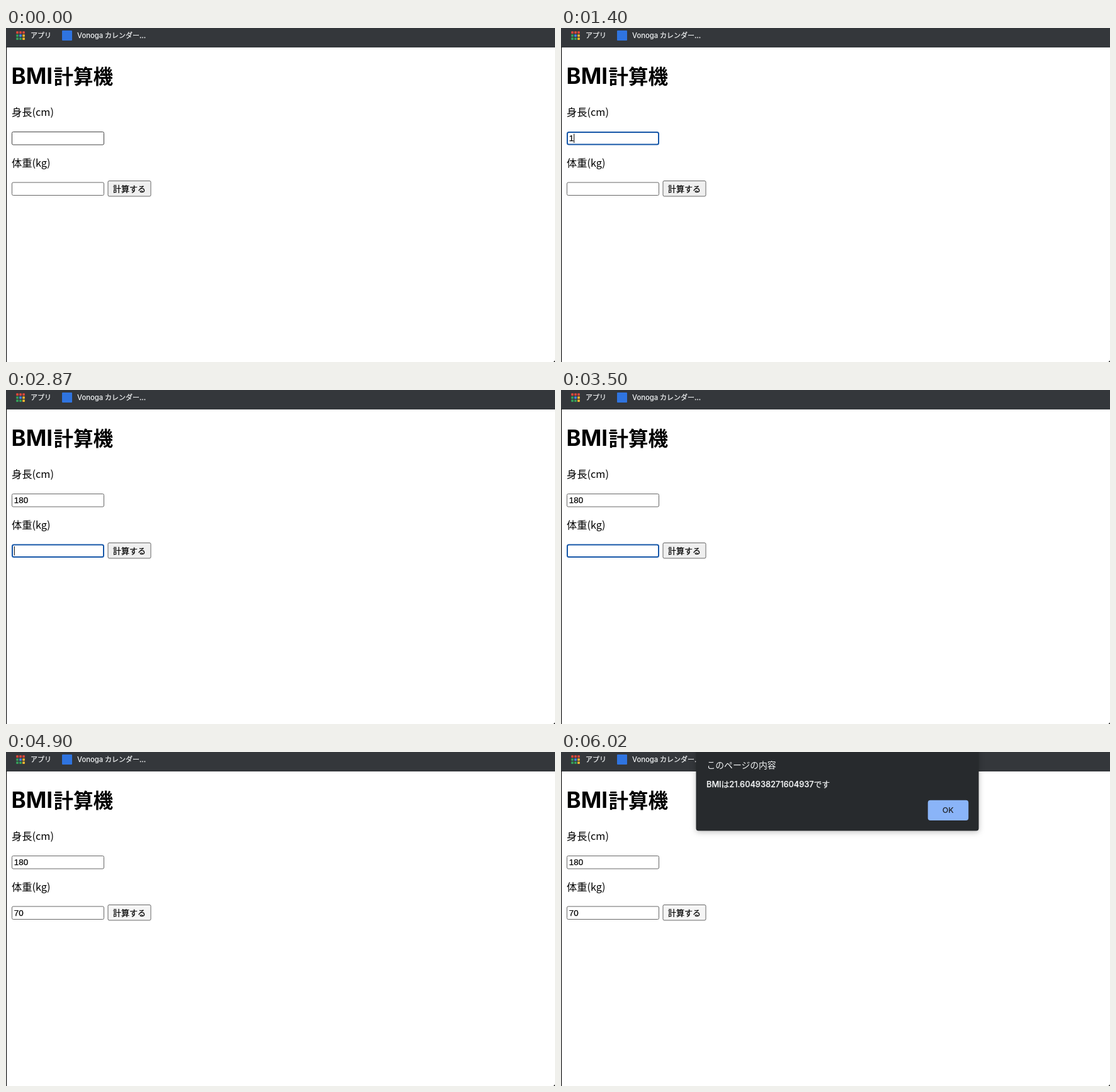
These frames come from a looping animation (872x532 px, 6160 ms). An HTML page:

```html
<!DOCTYPE html>
<html lang="ja">
<head>
<meta charset="utf-8">
<title>BMI計算機</title>
<style>
  html, body { margin: 0; width: 100%; height: 100%; overflow: hidden; background: #fff; }
  svg { display: block; width: 872px; height: 532px; }
  text { font-family: "Noto Sans CJK JP", "Noto Sans CJK", sans-serif; white-space: pre; }
  .ui { font-family: Inter, "Noto Sans CJK JP", "Noto Sans CJK", sans-serif; font-weight: 500; fill: #f1f3f4; }
  .value { font: 13.4px "Liberation Sans", sans-serif; }
  .firm { stroke: #000; stroke-width: .25px; }
  .ui.firm { stroke: #f1f3f4; }
  #dialog { filter: drop-shadow(0 2px 5px rgba(0, 0, 0, .25)); }
</style>
</head>
<body>
<svg id="stage" viewBox="0 0 872 532">
  <rect width="872" height="532" fill="#fff"/>
  <rect width="872" height="31" fill="#34373b"/>
  <rect y="30" width="1.2" height="502" fill="#151515"/>
  <path d="M872 529.5V532H869.5Z" fill="#222"/>
  <g id="apps"></g>
  <rect x="89" y="4" width="16" height="16" rx="1" fill="#2f74e0"/>
  <text class="ui firm" x="39" y="16" font-size="11">アプリ</text>
  <text class="ui" x="113" y="16" font-size="11.3">Vonoga</text>
  <text class="ui firm" x="157" y="16" font-size="11">カレンダー...</text>

  <text x="8.5" y="89" font-size="31.5" font-weight="700"><tspan font-family="Inter, sans-serif" font-size="35">BMI</tspan><tspan x="75.5">計算機</tspan></text>
  <text x="9" y="140" font-size="16.3">身長(cm)</text>
  <text x="9" y="220.5" font-size="16.3">体重(kg)</text>
  <g id="fields"></g>
  <rect id="button" x="162" y="243.5" width="68" height="24.5" rx="2"/>
  <text class="firm" x="170" y="260.5" font-size="13">計算する</text>

  <g id="dialog">
    <rect x="214.5" y="-8" width="449" height="133.5" rx="4" fill="#272a2d"/>
    <text class="ui" x="231.5" y="26" font-size="13.8" style="font-weight:400">このページの内容</text>
    <text class="ui firm" x="231" y="55.5" font-size="12.8">BMIは21.604938271604937です</text>
    <rect x="582.7" y="76.8" width="64.5" height="32.2" rx="4" fill="#8ab4f8"/>
    <text class="ui" x="614.7" y="97" font-size="12.3" text-anchor="middle" style="fill:#202124">OK</text>
  </g>
</svg>
<script>
const LOOP = 6160;
const DIGIT = 7.45;
const $ = id => document.getElementById(id);

function add(parent, tag, attrs) {
  const node = document.createElementNS("http://www.w3.org/2000/svg", tag);
  set(node, attrs);
  return parent.appendChild(node);
}

function set(node, attrs) {
  for (const name in attrs) node.setAttribute(name, attrs[name]);
}

const [red, green, blue, yellow] = ["#e0483b", "#35a05a", "#4285f4", "#f2b630"];
[red, red, red, green, blue, yellow, green, green, yellow].forEach((fill, i) =>
  add($("apps"), "rect", {
    x: 16.2 + i % 3 * 5, y: 5.2 + Math.floor(i / 3) * 5, width: 3.7, height: 3.7, rx: .6, fill
  }));

// keys: [time, typed text]; hidden: spans in which the blinking caret is off
const fields = [
  { y: 165, hover: 0, focus: 350, blur: 2870,
    keys: [[1190, "1"], [2030, "18"], [2380, "180"]],
    hidden: [[770, 1190], [1750, 2030]] },
  { y: 245.5, hover: 2730, focus: 2870, blur: 4900,
    keys: [[3710, "7"], [4060, "70"]],
    hidden: [[3360, 3710], [4550, 4900]] }
];

for (const f of fields) {
  f.box = add($("fields"), "rect", { fill: "#fff" });
  f.label = add($("fields"), "text", { class: "value firm", x: 12.8, y: f.y + 15 });
  f.caret = add($("fields"), "rect", { y: f.y + 3.5, width: 1, height: 14.5 });
}

const EDGE = "#666";
const HOVER_EDGE = "#444";
const within = (t, [from, to]) => t >= from && t < to;
const show = (node, on) => set(node, { visibility: on ? "visible" : "hidden" });

function drawField(f, t) {
  const focused = within(t, [f.focus, f.blur]);
  const hovered = within(t, [f.hover, f.focus]);
  const value = f.keys.reduce((text, [at, typed]) => t >= at ? typed : text, "");
  const inset = focused ? 1 : .5;
  set(f.box, {
    x: 9 + inset, y: f.y + inset, width: 147 - 2 * inset, height: 21.5 - 2 * inset,
    rx: focused ? 2.5 : 2,
    stroke: focused ? "#1556a8" : hovered ? HOVER_EDGE : EDGE,
    "stroke-width": focused ? 2 : 1
  });
  f.label.textContent = value;
  set(f.caret, { x: 12.8 + value.length * DIGIT });
  show(f.caret, focused && !f.hidden.some(span => within(t, span)));
}

function draw(t) {
  fields.forEach(f => drawField(f, t));
  const hovered = within(t, [4200, 4900]);
  set($("button"), {
    fill: t >= 4900 ? "#f5f5f5" : hovered ? "#e5e5e5" : "#efefef",
    stroke: hovered ? HOVER_EDGE : EDGE
  });
  const opening = t < 5180;
  show($("dialog"), t >= 5110);
  set($("dialog"), { opacity: opening ? .95 : 1, transform: `translate(0 ${opening ? -.5 : 0})` });
}

const start = performance.now();
function tick() {
  draw((performance.now() - start) % LOOP);
  requestAnimationFrame(tick);
}
tick();
</script>
</body>
</html>
```
